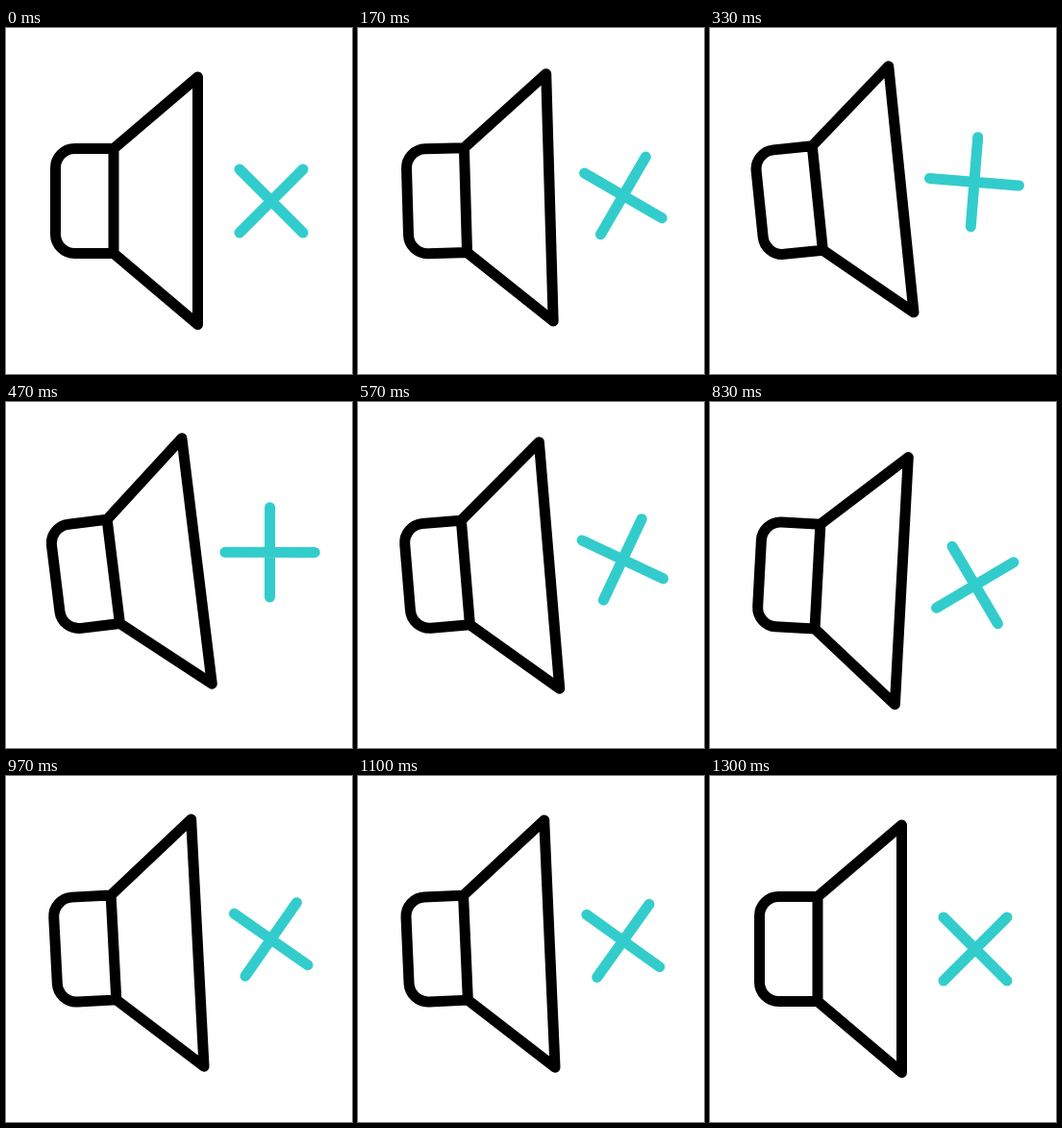
Recreate the animation shown at these times as an HTML page. Size 360x360 px, loop 2 s.

```html
<!DOCTYPE html>
<html lang="en">
<head>
<meta charset="utf-8">
<title>Muted speaker</title>
<style>
  html, body { margin: 0; height: 100%; overflow: hidden; background: #fff; }
  svg { display: block; width: 100%; height: 100%; }
</style>
</head>
<body>
<svg viewBox="0 0 360 360" fill="none" stroke-width="11" stroke-linecap="round" stroke-linejoin="round">
  <g id="speaker">
    <path stroke="#000" d="M112 125.5H71.5a20 20 0 0 0-20 20v69a20 20 0 0 0 20 20H112M112 125.5L199.5 51V308.5L112 234.5Z"/>
    <path id="cross" stroke="#33cccc" d="M243 147l66 66m0-66l-66 66"/>
  </g>
</svg>
<script>
  const LOOP = 2000, FPS = 30;
  const speaker = document.getElementById('speaker');
  const cross = document.getElementById('cross');

  // [frame, degrees], eased in and out between neighbours
  const speakerKeys = [[1.3, 0], [13, -7], [15, -7], [22.4, 5.5], [30, -3.4], [39, 0]];
  const crossKeys = [[0, 0], [13, -40], [22, 20], [30.3, -9], [39, 0]];

  function angleAt(keys, frame) {
    const next = keys.findIndex(key => key[0] > frame);
    if (next < 1) return 0;
    const [start, from] = keys[next - 1], [end, to] = keys[next];
    const u = (frame - start) / (end - start);
    return from + (to - from) * u * u * (3 - 2 * u);
  }

  function draw() {
    const time = performance.now() % LOOP;
    // The motion steps at 30 frames per second, on times rounded to 10 ms
    const frame = Math.floor((time + 3.5) * FPS / 1000);
    speaker.setAttribute('transform', `rotate(${angleAt(speakerKeys, frame)} 82 180)`);
    cross.setAttribute('transform', `rotate(${angleAt(crossKeys, frame)} 276 180)`);
    requestAnimationFrame(draw);
  }
  draw();
</script>
</body>
</html>
```
